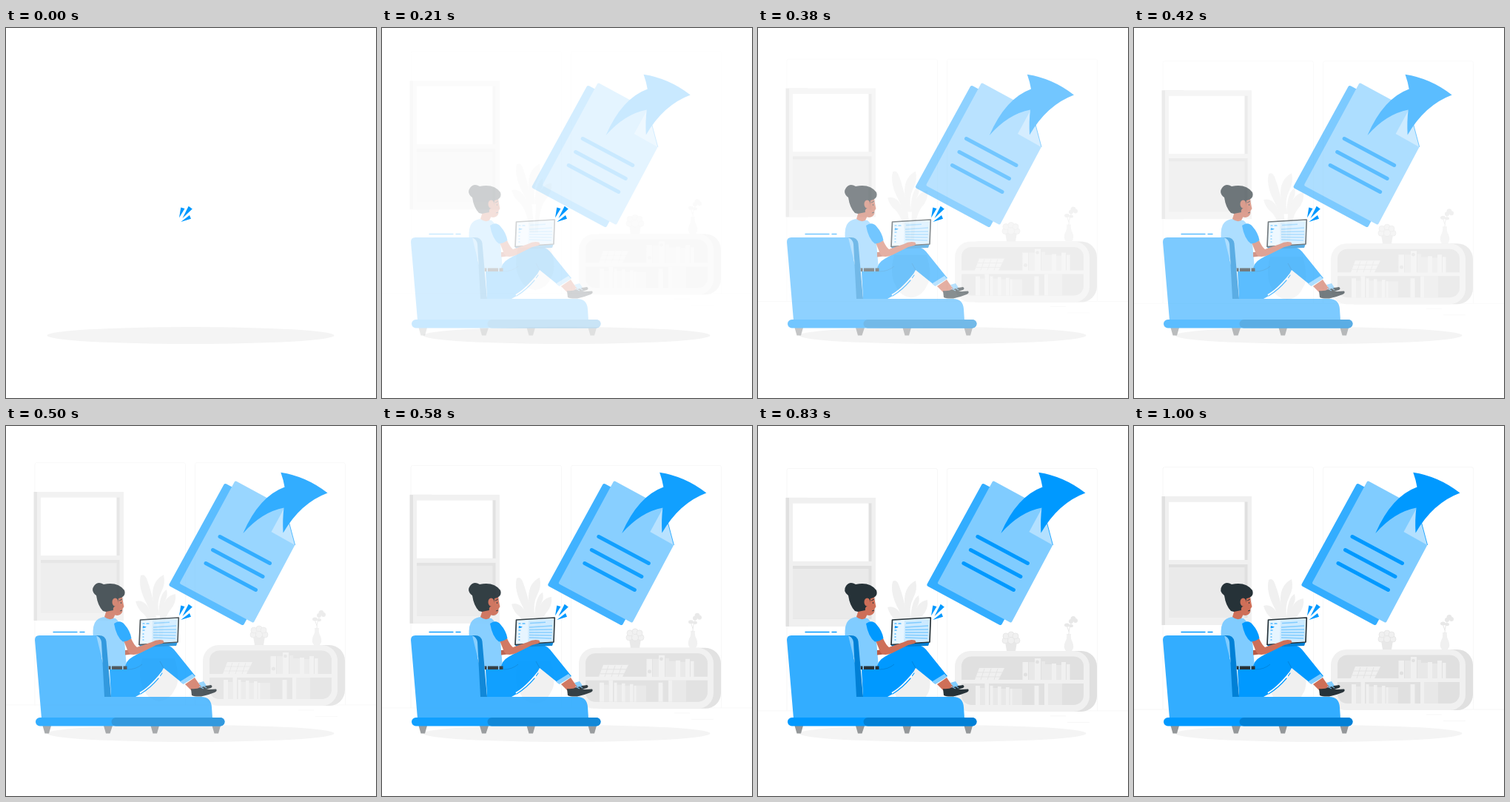
An HTML page that plays this animation: 500 by 500 pixels, repeating every 1.04 s.

```html
<!DOCTYPE html>
<html lang="en">
<head>
<meta charset="utf-8">
<title>Sharing a document</title>
<style>
  html, body { margin: 0; width: 100%; height: 100%; overflow: hidden; background: #fff; }
  svg { display: block; width: 100%; height: 100%; }
  .primary { fill: #09f; } .mid { fill: #33adff; } .pale { fill: #80ccff; } .deep { fill: #0080d6; }
  .dark { fill: #263238; } .skin { fill: #ce6f58; }
  .g1 { fill: #f0f0f0; } .g2 { fill: #e8e8e8; } .g3 { fill: #e0e0e0; }
  .line { fill: none; stroke: #09f; stroke-linecap: round; }
</style>
</head>
<body>
<svg viewBox="0 0 500 500">
  <ellipse cx="249.5" cy="415.5" rx="194" ry="11.5" fill="#f4f4f4"/>

  <g id="room" opacity="0">
    <g fill="none" stroke="#f7f7f7">
      <path d="M0 383H500M395 390H416M418 398.5H448"/>
      <path d="M39 383V58Q39 55.500 41.500 55.500H240Q242.500 55.500 242.500 58V383M255.500 383V58Q255.500 55.500 258 55.500H456Q458.500 55.500 458.500 58V383"/>
    </g>

    <g id="window">
      <rect class="g3" x="37.500" y="95" width="30" height="174"/>
      <rect class="g1" x="42" y="95" width="117" height="174"/>
      <rect class="g3" x="47" y="102.500" width="106.500" height="78.500"/>
      <rect fill="#fff" x="47" y="102.500" width="102.500" height="78.500"/>
      <rect class="g3" x="47" y="187" width="106.500" height="72"/>
      <rect fill="#eaeaea" x="47" y="191" width="102.500" height="68"/>
    </g>

    <g id="plant" class="g1">
      <path d="M182 208Q187 205 190 212Q197 230 202 256L206 300H201Q198 262 190 246Q178 224 182 208Z"/>
      <path d="M213 207Q199 214 198 232Q198 248 202 262L207 262Q203 243 210 230Q216 219 213 207Z"/>
      <path d="M229 233Q213 235 208 262L206 300H211Q212 268 221 256Q231 245 229 233Z"/>
      <path d="M217 227Q207 232 206 262H210Q213 245 216 240Q219 234 217 227Z"/>
      <path d="M175 243Q184 240 191 249Q200 262 204 300H200Q196 270 186 260Q178 254 175 243Z"/>
      <path d="M184 320H228Q237 350 228 362Q222 376 207 378Q192 376 186 362Q177 346 184 320Z"/>
    </g>

    <g id="shelf">
      <rect class="g3" x="276" y="302" width="182" height="82" rx="21"/>
      <rect class="g1" x="266" y="302" width="182" height="82" rx="21"/>
      <rect class="g3" x="275" y="309.500" width="165" height="65.500" rx="13"/>
      <path class="g2" d="M366 317h8v24h-8zM383 316h5v25h-5zM388 320h9v21h-9zM403 321h7v20h-7zM392 346h19v29h-19zM300 352h6v23h-6zM317 352h7v23h-7zM328 353h7v22h-7zM343 353h14v22h-14z"/>
      <path class="g1" d="M275 341h165v5h-165zM293 341L299 325H333L325 341zM357.500 317h7.500v24h-7.500zM374 312h8v29h-8zM397 319h6v22h-6zM410 317h6v24h-6zM417 320h4.500v21h-4.500z"/>
      <path class="g1" d="M294 349h6v26h-6zM306.500 346h5.500v29h-5.500zM313.500 349h4v26h-4zM324 350h4.500v25h-4.500zM335 351h4.500v24h-4.500zM340.500 353h3v22h-3zM373.500 349h6v26h-6zM387 346h5v29h-5z"/>
      <path fill="none" stroke="#e0e0e0" stroke-width=".8" d="M297 331H330M295 337H327M306 326L301 341M315 326L310 341M324 326L319 341"/>
      <circle class="g3" cx="361.500" cy="334" r="2.500"/><circle class="g3" cx="377.500" cy="317" r="2.300"/>
    </g>

    <g id="pots">
      <path class="g2" d="M334 290H350L348 302H336Z"/>
      <g class="g1" stroke="#e3e3e3" stroke-width=".7">
        <circle cx="334" cy="288" r="4"/><circle cx="350" cy="288" r="4"/><circle cx="335" cy="282" r="4"/>
        <circle cx="342" cy="280" r="4"/><circle cx="348" cy="282" r="4"/><circle cx="342" cy="288" r="4.500"/>
      </g>
      <path class="g1" d="M417 279H423Q422 285 425 290Q428 297 424 302H416Q412 297 415 290Q418 285 417 279Z"/>
      <path fill="none" stroke="#e8e8e8" d="M420 280Q420 268 426 260M420 276L417 267"/>
      <g class="g2"><circle cx="426" cy="258.500" r="3.500"/><circle cx="429" cy="261" r="3"/><circle cx="423" cy="262" r="3"/><ellipse cx="417.500" cy="267" rx="3.500" ry="2.500"/><ellipse cx="423" cy="268" rx="3" ry="2"/></g>
    </g>
  </g>

  <g id="papers" opacity="0">
    <path class="mid" stroke="#33adff" stroke-width="5" stroke-linejoin="round" d="M302.500 80.500L229 214.500L325.500 266.500L381 163L368 116Z"/>
    <path class="pale" stroke="#80ccff" stroke-width="4" stroke-linejoin="round" d="M316.500 76.500L243 212L339.500 263.500L394 161L382 112Z"/>
    <path fill="#b3e0ff" d="M383 109L364.500 143L396.500 161Z"/>
    <path class="line" stroke-width=".8" d="M383.500 112L396.500 160.500"/>
    <path class="line" stroke-width="5" d="M295 149.500L362.500 185.500M285.500 167.500L353 203.500M276 185.500L343.500 221.500"/>
    <path class="primary" d="M326.300 145Q348 95 382.500 82.500Q381 73 377.300 62.700Q412 68 440.500 90.500Q404 104 380.500 144.500Q379.500 126 381.500 110.500Q352 116 326.300 145Z"/>
  </g>

  <g id="reader" opacity="0">
    <path class="line" stroke-width="1.300" d="M64 278.500H96M100 278.500H106"/>

    <g id="shoes">
      <path class="dark" d="M260 350Q268 352 277 350Q280 352 277 354L264 358Z"/>
      <path class="pale" d="M260 347L267 345L271 351L264 353Z"/>
      <path class="skin" d="M242 349L255 340L264 353L251 358Z"/>
      <path class="dark" d="M250 355Q257 356 263 353Q266 357 284 355.500Q286 358 282 360Q272 364 264 365.500Q255 366 251 364Z"/>
      <path fill="none" stroke="#80ccff" d="M263 349L271 354M261 352L267 355"/>
    </g>

    <path class="pale" d="M117.500 283Q117 268 122 263Q127 258 135 258L148 260Q158 268 160 290L163 326H139L120 300Z"/>
    <path class="skin" d="M133 258L137 245L149 252L145 260Q139 263 133 258Z"/>
    <path class="skin" d="M143 235L157 230Q158 239 159.500 244L157.500 247Q158 255 151 256Q145 256 142 250Z"/>
    <path class="dark" d="M131 250Q124 243 122 229Q114 223 119 216Q124 209 132 214Q151 210 160 222Q163 231 152 233Q152 240 148 243Q144 245 145 249L135 251Z"/>
    <ellipse class="skin" cx="147.500" cy="238" rx="4" ry="5.500"/>
    <path fill="none" stroke="#263238" d="M153 236L157 234M155.500 238V240M154 250L157 249"/>

    <path class="mid" d="M39 289Q39 283 45 283H122L142 366H264Q277 366 278 380L279 395H48Z"/>
    <path class="deep" d="M121 283H126Q134 283 135.500 291L142 366H133L129 292Q128 285 121 283Z"/>

    <g id="legs">
      <path class="primary" d="M140 329H161Q160 318 171 312L194 299Q218 291 227 302L256 338L239 348L213 327Q200 353 175 366H142Z"/>
      <path fill="none" stroke="#fff" stroke-width="2.200" d="M181 361Q194 354 211 333"/>
      <path class="line" stroke-width="1.200" d="M182 362Q195 354 206 341M208.500 337.500L211 334"/>
      <path fill="none" stroke="#0080d6" stroke-width=".8" d="M164 329Q176 329 184 322M208 318L213 327"/>
      <path class="pale" d="M235 345.500L252 335L255.500 339Q248 344 239.500 349Z"/>
    </g>
    <path class="dark" d="M138.500 324.500H163.500V329H139Z"/>
    <path fill="#80ccff" d="M141.500 324h1.500v5h-1.500zM157 324h1.500v5h-1.500z"/>

    <g id="laptop">
      <path class="deep" d="M179 295L232 291.500L230 297L182 299Z"/>
      <path fill="#e6f5ff" stroke="#263238" stroke-width="1.700" stroke-linejoin="round" d="M181.500 262L233.300 259L232 292L180 295.500Z"/>
      <path fill="#cceaff" d="M198 263L231.500 261L230.500 291L197 293Z"/>
      <path fill="none" stroke="#80ccff" stroke-width="1.600" d="M200 266.500L221 265.300M199 272L230 270M199 275.500L230 275M199 279L230 279M199 282.500L229.500 283M199 286L229 287"/>
      <path class="line" stroke-width="1.200" d="M185 267H187M190 267H193M185 272H188M185 276H187M185 281H186M185 285H186M185 289H186"/>
      <path class="primary" d="M185 270L190 271.500L185 273.500Z"/>
    </g>
    <path fill="#b85b47" d="M161 303L170 302L174 308L161 309.500Z"/>
    <path class="skin" d="M159 290L169 287Q173 296 177 299L197 292Q204 288 212 289.500Q215 292 211 294L203 296L181 307Q169 312 165 305Z"/>
    <path class="primary" d="M146 267Q154 261 160 268Q168 277 169.500 287Q164 291 158 291.500Q149 285 146 267Z"/>

    <path fill="#949799" d="M49.500 405H61L58 415.500H52.500ZM132 405H144L140.500 415.500H135ZM195.500 405H207L204 415.500H198.500ZM278.500 405H290L287 415.500H281.500Z"/>
    <rect class="primary" x="40" y="394" width="255.500" height="11.500" rx="5.700"/>
    <rect class="deep" x="142.500" y="394" width="153" height="11.500" rx="5.700"/>
  </g>

  <path class="primary" d="M234 256.500L236.300 242.500L241.500 244ZM238.500 257L246.700 240.800L251.800 244.500ZM236.300 262L248 253L250 257.700Z"/>
</svg>
<script>
const LOOP = 1040, STEP = 1000 / 24, LEAD = 31, SLIDE = 30;
const [room, papers, reader] = ['room', 'papers', 'reader'].map(id => document.getElementById(id));

const cubic = (a, b, s) => 3 * a * s * (1 - s) ** 2 + 3 * b * s * s * (1 - s) + s ** 3;

// cubic-bezier(.36, -.01, .5, 1.38), solved by bisection
function ease(x) {
  if (x >= 1) return 1;
  let lo = 0, hi = 1;
  for (let i = 0; i < 24; i++) {
    const s = (lo + hi) / 2;
    if (cubic(.36, .5, s) < x) lo = s; else hi = s;
  }
  return cubic(-.01, 1.38, lo);
}

function draw(time) {
  const step = Math.floor((time % LOOP + 5) / STEP);
  const p = step < 2 ? 0 : ease((step * STEP + LEAD) / 1000);
  const shift = SLIDE * (p - 1);
  for (const part of [room, papers, reader]) part.setAttribute('opacity', Math.min(1, p));
  room.setAttribute('transform', `translate(0 ${shift})`);
  papers.setAttribute('transform', `translate(${shift} 0)`);
}

function tick() {
  draw(performance.now());
  requestAnimationFrame(tick);
}
tick();
</script>
</body>
</html>
```
